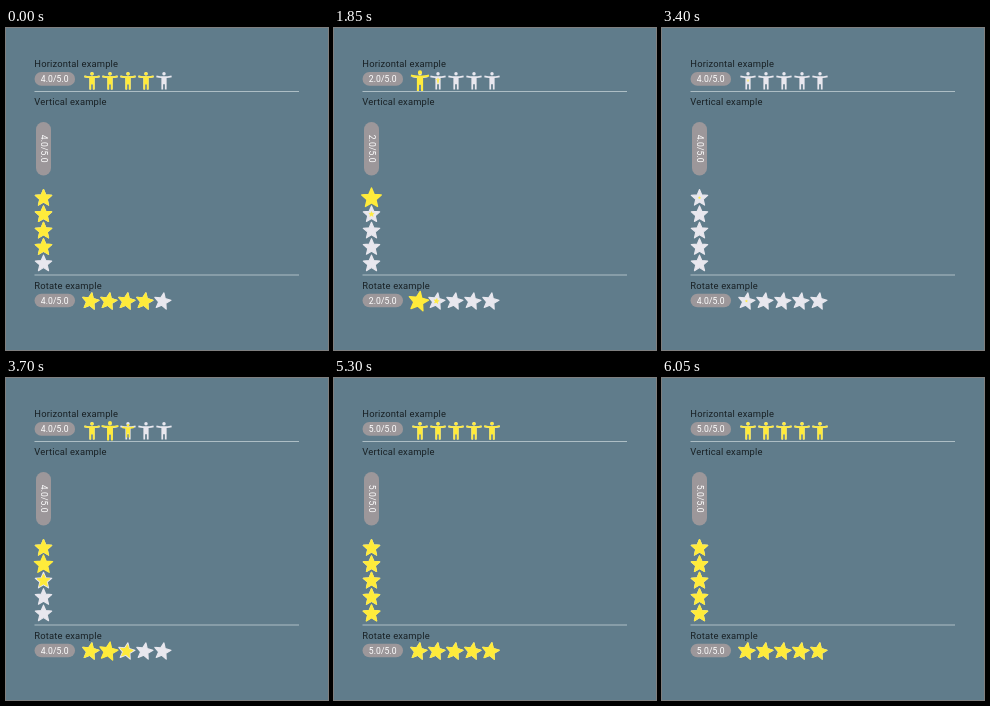
Animation of 322x322 px, one loop 6.3 s. Source, as an HTML page:

```html
<!DOCTYPE html>
<html lang="en">
<head>
<meta charset="utf-8">
<title>Rating examples</title>
<style>
  html, body { margin: 0; width: 100%; height: 100%; overflow: hidden; background: #607c8b; }
  svg { display: block; width: 100%; height: 100%; }
  text { font-family: Roboto, Arial, sans-serif; }
  .title { font-size: 9.4px; letter-spacing: .17px; fill: #182024; }
  .score { font-size: 8.6px; letter-spacing: .08px; fill: #fff; text-anchor: middle; }
  .badge { fill: #9c979a; }
  .line { stroke: #adbec5; stroke-width: 1.1; }
  .icon { stroke-linejoin: round; }
</style>
</head>
<body>
<svg id="stage" viewBox="0 0 322 322"></svg>
<script>
const LOOP = 6300;
const COUNT = 5;
const STAGGER = 100, RISE = 145, FALL = 85, PEAK = 1.25;
const EMPTY = '#e8e7ee', FILLED = '#ffeb3b';

const STAR = {
  path: 'M12 17.27 18.18 21 16.54 13.97 22 9.24 14.81 8.63 12 2 9.19 8.63 2 9.24 7.46 13.97 5.82 21z',
  size: 0.82,
  stroke: 1.4
};
const PERSON = {
  path: 'M20.5 6c-2.61.7-5.67 1-8.5 1s-5.89-.3-8.5-1L3 8c1.86.5 4 .83 6 1v13h2v-6h2v6h2V9' +
    'c2-.17 4.14-.5 6-1zM12 6a2 2 0 0 0 0-4a2 2 0 0 0 0 4z',
  size: 0.87,
  stroke: 0
};

// The score changes at "at"; the icons rewind until "fill", then fill again.
const changes = [
  { at: -LOOP, fill: -LOOP, rating: 4 },
  { at: 1700, fill: 1960, rating: 2 },
  { at: 3150, fill: 3410, rating: 4 },
  { at: 5300, fill: 5360, rating: 5 }
];

const rows = [
  { icon: PERSON, x: 86, y: 52.7, dx: 18, dy: 0, tilt: 0 },
  { icon: STAR, x: 37.5, y: 169.7, dx: 0, dy: 16.4, tilt: 0 },
  { icon: STAR, x: 84.5, y: 273, dx: 18, dy: 0, tilt: 10 }
];

const stage = document.getElementById('stage');

function add(tag, attrs, content = '') {
  const node = document.createElementNS('http://www.w3.org/2000/svg', tag);
  for (const name in attrs) node.setAttribute(name, attrs[name]);
  node.textContent = content;
  return stage.appendChild(node);
}

function addBadge(x, y, width, height, angle) {
  add('rect', { class: 'badge', x: x - width / 2, y: y - height / 2, width, height, rx: Math.min(width, height) / 2 });
  return add('text', { class: 'score', transform: `translate(${x} ${y}) rotate(${angle})`, y: 3 });
}

function addIcon({ path, stroke }, color) {
  return add('path', { class: 'icon', d: path, fill: color, stroke: color, 'stroke-width': stroke });
}

function place(node, row, i, scale) {
  node.setAttribute('transform',
    `translate(${row.x + row.dx * i} ${row.y + row.dy * i}) rotate(${row.tilt}) ` +
    `scale(${row.icon.size * scale}) translate(-12 -12)`);
}

[['Horizontal example', 39.2], ['Vertical example', 77.3], ['Rotate example', 261]]
  .forEach(([label, y]) => add('text', { class: 'title', x: 28.3, y }, label));
[63.5, 247].forEach(y => add('line', { class: 'line', x1: 28.5, x2: 293, y1: y, y2: y }));

const scores = [
  addBadge(48.8, 50.9, 40.5, 13.6, 0),
  addBadge(37.5, 120.7, 15, 53.5, 90),
  addBadge(48.8, 272.5, 40.5, 13.6, 0)
];

const icons = [];
for (const row of rows) {
  for (let i = 0; i < COUNT; i++) place(addIcon(row.icon, EMPTY), row, i, 1);
  for (let i = 0; i < COUNT; i++) icons.push({ row, i, node: addIcon(row.icon, FILLED) });
}

function popScale(age) {
  if (age <= 0) return 0;
  if (age < RISE) return PEAK * age / RISE;
  return Math.max(1, PEAK - (PEAK - 1) * (age - RISE) / FALL);
}

function progress(time, { at, fill, rating }) {
  if (time >= fill) return time - fill;
  const total = (rating - 1) * STAGGER + RISE + FALL;
  return total * (fill - time) / (fill - at);
}

function render(time) {
  const change = changes.filter(({ at }) => at <= time).pop();
  const elapsed = progress(time, change);
  scores.forEach(score => { score.textContent = change.rating.toFixed(1) + '/5.0'; });
  for (const { row, i, node } of icons) {
    const scale = i < change.rating ? popScale(elapsed - i * STAGGER) : 0;
    place(node, row, i, scale);
    node.setAttribute('visibility', scale > 0 ? 'visible' : 'hidden');
  }
}

const start = performance.now();
function tick() {
  render((performance.now() - start) % LOOP);
  requestAnimationFrame(tick);
}
tick();
</script>
</body>
</html>
```
